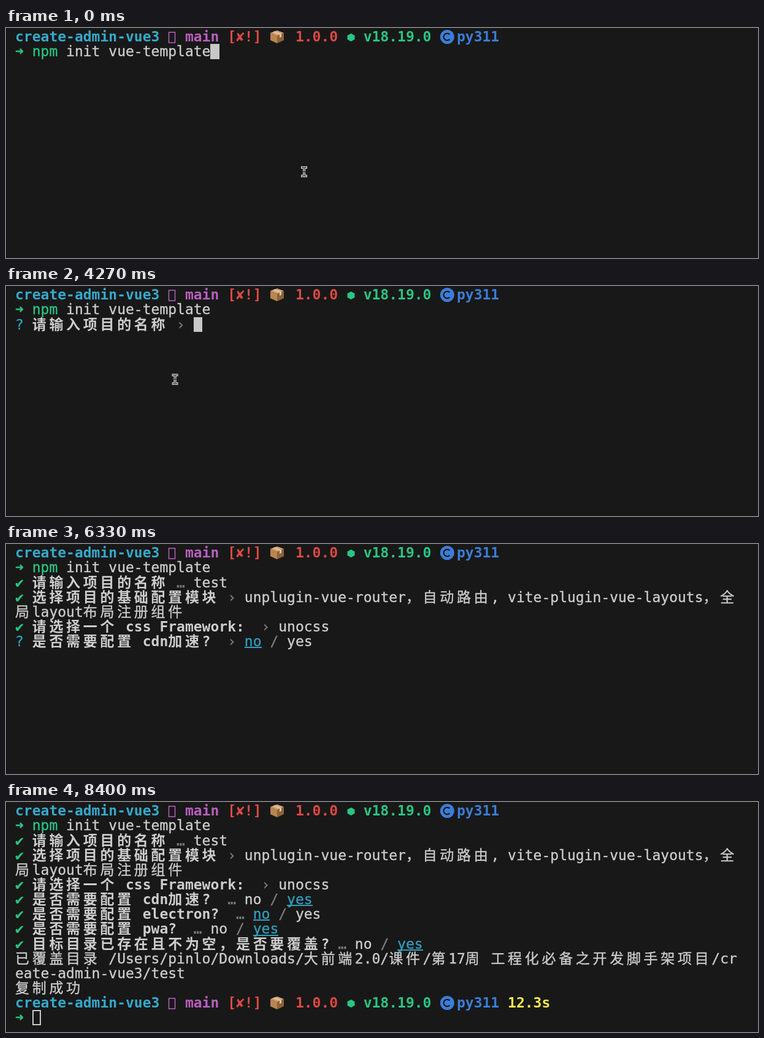
Animation, 1226 px wide and 376 px high, one loop 8.47 s. Source, as an HTML page:

```html
<!DOCTYPE html>
<html lang="zh-CN">
<head>
<meta charset="utf-8">
<title>Terminal</title>
<style>
html, body { margin: 0; width: 100%; height: 100%; overflow: hidden; background: #181818; }
body { position: relative; box-shadow: inset 1px 0 #0c0c0c; }
#screen span, svg, #cursor { position: absolute; }
#screen span {
  font: 23px/24.15px "DejaVu Sans Mono", "Noto Sans CJK SC", "Noto Sans CJK", monospace;
  height: 24.15px; white-space: pre; color: #cdcdcd; -webkit-text-stroke: .35px;
}
#screen .wide { letter-spacing: 4.69px; }
#screen .B, #screen .C, #screen .M, #screen .R, #screen .G, #screen .P, #screen .Y {
  font-weight: bold; -webkit-text-stroke: 0;
}
#screen .C { color: #35a9cb; }
#screen .M { color: #b95fc0; }
#screen .R { color: #dc4943; }
#screen .G, #screen .g, #screen .o { color: #27c583; }
#screen .P { color: #3b7dd8; }
#screen .Y { color: #f3ea4a; }
#screen .d { color: #7c7c7c; }
#screen .c, #screen .u { color: #2f9fbd; }
#screen .o, #screen .O { -webkit-text-stroke: 1.3px; }
#screen .u::after {
  content: ""; position: absolute; left: 0; right: 0; bottom: 1px; height: 2px; background: #2f9fbd;
}
#cursor { box-sizing: border-box; width: 14.5px; height: 24.5px; border: 2px solid #c8c8c8; }
svg { left: 0; top: 0; overflow: visible; }
</style>
</head>
<body>
<div id="screen"></div>
<div id="cursor"></div>
<svg id="mouse" width="1" height="1" fill="none">
  <path d="M-5-7h3q2 0 2 2q0-2 2-2h3M-5 7h3q2 0 2-2q0 2 2 2h3M0-5V5" stroke="#d6d6d6" stroke-width="4"/>
  <path d="M-4-7h2q2 0 2 2q0-2 2-2h2M-4 7h2q2 0 2-2q0 2 2 2h2M0-5V5M-2 0h4" stroke="#333" stroke-width="1.3"/>
</svg>
<script>
const LOOP = 8470, CELL = 13.846, ROW = 24.15, LEFT = 15, TOP = 2.2;
const $ = id => document.getElementById(id);
const WIDE = /[\u2e80-\u9fff\uff00-\uffef]/;
const SAME_WIDTH = /[\u2e80-\u9fff\uff00-\uffef]+|[^\u2e80-\u9fff\uff00-\uffef]+/g;

// Each line is a list of runs split by "~"; the first letter is the style.
const HEAD = "Ccreate-admin-vue3~w   ~Mmain ~R[✘!]    1.0.0   ~Gv18.19.0   ~Ppy311";
const COMMAND = "g➜ npm~w init vue-template";
const LAYOUTS = "vite-plugin-vue-layouts，全";
const LAYOUTS_REST = "局layout布局注册组件";
const ask = text => `c?~B ${text}~d › `;
const done = (text, mark = "…") => `g✔~B ${text}~d ${mark} `;
const toggle = yes => yes ? "~wno~d / ~uyes" : "~uno~d / ~wyes";

const NAME = "请输入项目的名称", MODULES = "选择项目的基础配置模块";
const FRAMEWORK = "请选择一个 css Framework: ";
const QUESTIONS = [
  // text, time asked, time of the change to yes, time answered
  ["是否需要配置 cdn加速? ", 6270, 6340, 6400],
  ["是否需要配置 electron? ", 6400, Infinity, 6530],
  ["是否需要配置 pwa? ", 6530, 6600, 6740],
  ["目标目录已存在且不为空，是否要覆盖?", 6740, 6870, 7200]
];

const ICONS = `
  <rect x="265.5" y="7" width="10" height="17" stroke="#b95fc0" stroke-width="1.5" fill="none"/>
  <path d="M431 8L442 4L453 8L442 13Z" fill="#d2a572"/>
  <path d="M431 8L442 13V25L431 20Z" fill="#b98550"/>
  <path d="M453 8L442 13V25L453 20Z" fill="#8d6238"/>
  <path d="M435 6.5L446 11V16L449 14.5V9.5L438 5.3Z" fill="#e2c49b"/>
  <path d="M562.5 9L568.5 12.3V18.7L562.5 22L556.5 18.7V12.3Z" fill="#27c583"/>
  <circle cx="719.3" cy="14.5" r="11.5" fill="#3b7dd8"/>
  <path d="M723.3 10.5A5.7 5.7 0 1 0 723.3 18.5" stroke="#181818" stroke-width="2.2" fill="none"/>`;

function menu(t) {
  const active = t < 5870 ? 0 : 1;
  const picked = [t >= 5800, t >= 5940, false];
  const options = ["unplugin-vue-router，自动路由", LAYOUTS + LAYOUTS_REST, "vite-plugin-mock，mock接口"];
  return [
    ask(MODULES) + "- 空格用于 选择/取消选择 切换，回车用于确认选择",
    "wInstructions:",
    "w    ↑/↓: Highlight option",
    "w    ←/→/[space]: Toggle selection",
    "w    a: Toggle all",
    "w    enter/return: Complete answer",
    ...options.map((text, i) => `${picked[i] ? "o◉" : "O○"}~w   ~${i === active ? "u" : "w"}${text}`)
  ];
}

function screen(t) {
  const lines = [HEAD, COMMAND];
  if (t < 1600) return { lines, cursor: [23, 1] };
  if (t < 2600) return { lines, cursor: [0, 2] };
  if (t < 5450) {
    const typed = Math.max(0, Math.min(4, Math.floor((t - 4870) / 90) + 1));
    lines.push(ask(NAME) + "~w" + "test".slice(0, typed));
    return { lines, cursor: [21 + typed, 2] };
  }
  lines.push(done(NAME) + "~wtest");
  if (t < 6130) return { lines: lines.concat(menu(t)) };
  lines.push(done(MODULES, "›") + "~wunplugin-vue-router，自动路由, " + LAYOUTS, "w" + LAYOUTS_REST);
  lines.push(t < 6270 ? ask(FRAMEWORK) : done(FRAMEWORK, "›") + "~wunocss");
  for (const [text, asked, change, answered] of QUESTIONS) {
    if (t >= asked) lines.push((t < answered ? ask(text) : done(text)) + toggle(t >= change));
  }
  if (t < 7200) return { lines };
  lines.push("w已覆盖目录 /Users/pinlo/Downloads/大前端2.0/课件/第17周 工程化必备之开发脚手架项目/cr",
    "weate-admin-vue3/test");
  if (t < 7270) return { lines, cursor: [0, 12] };
  lines.push("w复制成功");
  if (t < 7400) return { lines, cursor: [0, 13] };
  lines.push(HEAD + "~Y 12.3s", "g➜");
  return { lines, cursor: [2, 14], hollow: t >= 8000 };
}

function lineHtml(line, row) {
  let col = 0, html = "";
  const top = TOP + row * ROW;
  for (const run of line.split("~")) {
    for (const part of run.slice(1).match(SAME_WIDTH) || []) {
      const wide = WIDE.test(part), cells = part.length * (wide ? 2 : 1);
      html += `<span class="${run[0]}${wide ? " wide" : ""}" style="left:${LEFT + col * CELL}px;` +
        `top:${top}px;width:${cells * CELL}px">${part}</span>`;
      col += cells;
    }
  }
  if (line.startsWith(HEAD)) html += `<svg width="1" height="1" style="top:${row * ROW}px">${ICONS}</svg>`;
  return html;
}

// Pointer path: time, x, y
const PATH = [[2900, 200, 82], [3300, 158, 43], [3400, 158, 43], [3900, 225, 112], [4500, 300, 172], [4870, 300, 172]];

function pointer(t) {
  if (t < 1600) return [486, 235];
  const i = PATH.findIndex(p => t < p[0]);
  if (i < 1) return null;
  const [t0, x0, y0] = PATH[i - 1], [t1, x1, y1] = PATH[i];
  const k = (t - t0) / (t1 - t0), s = k * k * (3 - 2 * k);
  return [x0 + (x1 - x0) * s, y0 + (y1 - y0) * s];
}

let shown = "";
const start = performance.now();

function draw() {
  const t = (performance.now() - start) % LOOP;
  const { lines, cursor, hollow } = screen(t);
  const html = lines.map(lineHtml).join("");
  if (html !== shown) $("screen").innerHTML = shown = html;

  const block = $("cursor").style;
  block.display = cursor ? "block" : "none";
  if (cursor) {
    block.left = LEFT + cursor[0] * CELL + "px";
    block.top = TOP + cursor[1] * ROW + "px";
    block.background = hollow ? "none" : "#c8c8c8";
  }

  const at = pointer(t);
  $("mouse").style.display = at ? "block" : "none";
  if (at) $("mouse").style.transform = `translate(${at[0]}px,${at[1]}px)`;
  requestAnimationFrame(draw);
}
draw();
</script>
</body>
</html>
```
